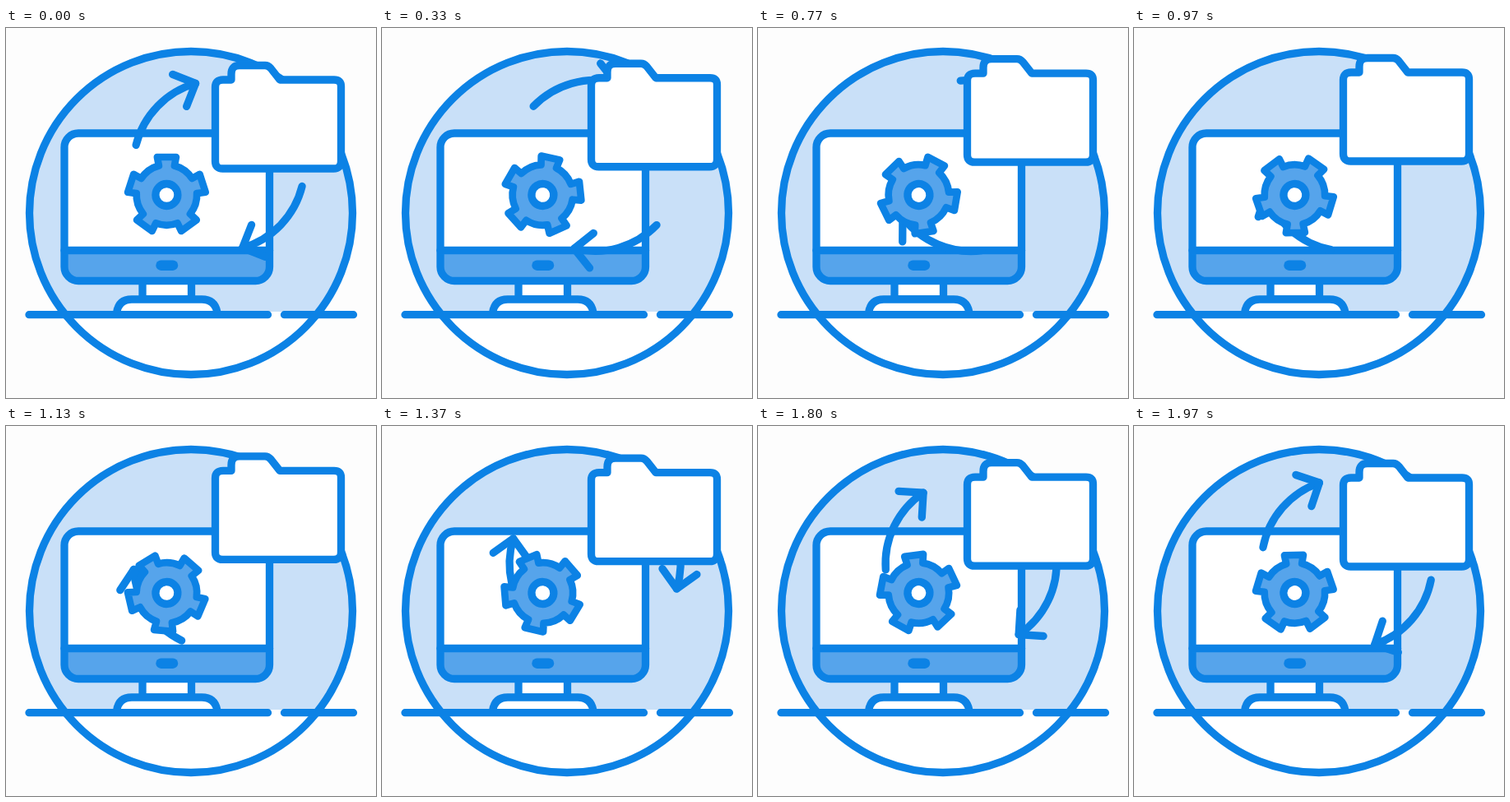
Animation of 450x450 px, one loop 2.01 s. Source, as an HTML page:

```html
<!DOCTYPE html>
<html lang="en">
<head>
<meta charset="utf-8">
<title>File sync</title>
<style>
  html, body { margin: 0; width: 100%; height: 100%; overflow: hidden; background: #fdfdfd; }
  svg { display: block; width: 100vw; height: 100vh; }
  .line { fill: none; stroke: #0c82e5; stroke-width: 9.3; stroke-linecap: round; stroke-linejoin: round; }
  .white { fill: #fff; }
  .sky { fill: #c9e0f8; }
  .mid { fill: #56a4eb; }
</style>
</head>
<body>
<svg viewBox="0 0 450 450">
  <defs>
    <clipPath id="above"><path d="M0 0H450V345H0Z"/></clipPath>
    <g id="arrow" class="line">
      <path d="M-101 -25A104 104 0 0 1 -28.5 -100"/>
      <path d="M-56.5 -111L-28.5 -100L-39.5 -72"/>
    </g>
  </defs>

  <circle class="white" cx="225" cy="225" r="196.5"/>
  <circle class="sky" cx="225" cy="225" r="196.5" clip-path="url(#above)"/>
  <circle class="line" cx="225" cy="225" r="196.5"/>

  <!-- stand and ground -->
  <path class="line white" d="M166 308V330H225.5V308"/>
  <path class="line white" d="M134.7 346Q137 330 153 330H238Q254 330 257 346"/>
  <path class="line" d="M28 348.7H318.5M338.5 348.7H422.5"/>

  <!-- monitor -->
  <rect class="white" x="71" y="128" width="249.5" height="179.5" rx="17"/>
  <path class="mid" d="M71 270.5H320.5V290.5Q320.5 307.5 303.5 307.5H88Q71 307.5 71 290.5Z"/>
  <rect class="line" x="71" y="128" width="249.5" height="179.5" rx="17"/>
  <path class="line" d="M71 270.5H320.5"/>
  <path class="line" style="stroke-width:12.5" d="M188.5 288.7H203"/>

  <g id="arrows">
    <use href="#arrow"/>
    <use href="#arrow" transform="rotate(180)"/>
  </g>

  <g id="gear">
    <path id="teeth" class="line mid" style="stroke-width:8.7"/>
    <circle class="line white" r="13.5"/>
  </g>

  <path id="folder" class="line white" d="M264 63H274V56Q274 45.5 284 45.5H315Q319 45.5 322 49L333 63H399Q407.5 63 407.5 71V162Q407.5 171 398.5 171H263.5Q254.5 171 254.5 162V72Q254.5 63 264 63Z"/>
</svg>
<script>
  const LOOP = 2010, POSES = 60, TEETH = 5;
  const el = id => document.getElementById(id);

  function gearPath() {
    const corners = [[-9.5, -35.5], [-11.5, -46], [11.5, -46], [9.5, -35.5]];
    let d = '';
    for (let i = 0; i < TEETH; i++) {
      const a = i * 2 * Math.PI / TEETH, c = Math.cos(a), s = Math.sin(a);
      corners.forEach(([x, y], k) => {
        const join = k ? 'L' : i ? 'A36.7 36.7 0 0 1 ' : 'M';
        d += `${join}${(x * c - y * s).toFixed(2)} ${(x * s + y * c).toFixed(2)}`;
      });
    }
    return d + 'A36.7 36.7 0 0 1 -9.5 -35.5Z';
  }

  // Poses change every 33 1/3 ms, rounded to 10 ms.
  const poseAt = ms => Math.min(POSES - 1, Math.floor((Math.floor(ms / 10) + 0.5) * 0.3));

  function draw(ms) {
    const p = poseAt(ms) / POSES;
    const lift = 4.5 * (1 - Math.cos(2 * Math.PI * p));
    el('arrows').setAttribute('transform', `translate(259.1 167.4) rotate(${180 * p})`);
    el('gear').setAttribute('transform', `translate(195.4 203) rotate(${360 / TEETH * p})`);
    el('folder').setAttribute('transform', `translate(0 ${-lift})`);
  }

  el('teeth').setAttribute('d', gearPath());
  const start = performance.now();
  function tick() {
    draw((performance.now() - start) % LOOP);
    requestAnimationFrame(tick);
  }
  tick();
</script>
</body>
</html>
```
